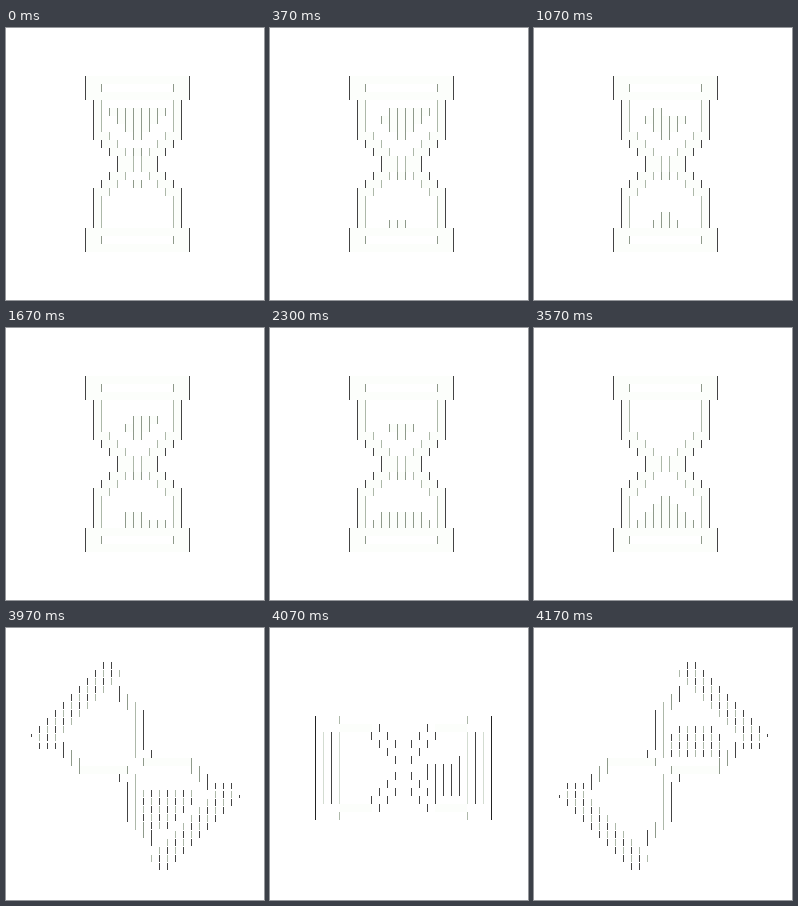
An HTML page with a canvas for the animation above (4.2 s loop, 258 by 272 pixels).

```html
<!DOCTYPE html>
<html lang="en">
<head>
<meta charset="utf-8">
<title>Hourglass</title>
<style>
  html, body { margin: 0; width: 100%; height: 100%; overflow: hidden; background: #fff; }
  canvas { display: block; }
</style>
</head>
<body>
<canvas id="stage" width="258" height="272"></canvas>
<script>
const ctx = document.getElementById('stage').getContext('2d');
const LOOP = 4200, CELL = 8;
const DARK = '#444', MID = '#8f9a8b', LIGHT = '#adb8a9', SOFT = '#d3dcd1', PALE = '#fcfefb';

// time, sand leaving above, sand landing below; sand as triples: row, first column, last column
const STEPS = [
  [370, [0, 3, 4], [0, 5, 6]],
  [700, [0, 6, 7], [0, 7, 7]],
  [1070, [0, 8, 9], [1, 6, 6]],
  [1370, [0, 5, 5], [0, 8, 9]],
  [1670, [1, 4, 5], [1, 5, 5]],
  [1970, [1, 6, 6], [0, 3, 4, 1, 4, 4]],
  [2300, [1, 7, 8], [1, 7, 8]],
  [2600, [2, 6, 7], [2, 6, 7]],
  [2900, [2, 5, 5], [2, 5, 5]],
  [3270, [3, 6, 6], [3, 6, 6]],
  [3570, [], []]
];

function fill(x, y, w, h, color) {
  ctx.fillStyle = color;
  ctx.fillRect(x, y, w, h);
}

function line(x, y0, y1, color = DARK) {
  fill(x, y0, 1, y1 - y0, color);
}

// one line and its three mirror images; sx and sy are the mirror sums
function quad(sx, sy, x, y0, y1, color) {
  for (const mx of [x, sx - x]) {
    line(mx, y0, y1, color);
    line(mx, sy - y1, sy - y0, color);
  }
}

function eachCell(triples, visit) {
  for (let i = 0; i < triples.length; i += 3)
    for (let c = triples[i + 1]; c <= triples[i + 2]; c++) visit(triples[i], c);
}

function drawCell(c, y) {
  const x = 79 + c * CELL;
  fill(x + 1, y, CELL - 1, CELL, PALE);
  line(x, y, y + CELL, MID);
  line(x + CELL, y, y + CELL, MID);
}

function upright(step) {
  const edge = (x, y0, y1, color) => quad(262, 272, x, y0, y1, color);
  // glass wall: pale body, dark outside, light inside
  const wall = (x0, x1, y0, y1) => {
    for (let x = x0 + 1; x < x1; x++) edge(x, y0, y1, PALE);
    edge(x0, y0, y1);
    edge(x1, y0, y1, LIGHT);
  };
  for (const y of [48, 200]) {
    fill(80, y, 103, 24, PALE);
    fill(96, y + 8, 71, 8, '#fff');
  }
  edge(79, 48, 72);
  edge(95, 56, 64, MID);
  wall(87, 95, 72, 104);
  wall(87, 103, 104, 112);
  wall(95, 111, 112, 120);
  wall(103, 119, 120, 128);
  wall(111, 127, 128, 136);

  const top = new Set();
  for (let r = 0; r < 4; r++)
    for (let c = 3 + r; c <= 9 - r; c++) top.add(r * 16 + c);
  for (const [, out, landed] of STEPS.slice(0, step)) {
    eachCell(out, (r, c) => top.delete(r * 16 + c));
    eachCell(landed, (r, c) => drawCell(c, 192 - r * CELL));
  }
  for (const id of top) drawCell(id % 16, 80 + (id >> 4) * CELL);

  // falling grains in the neck
  if (step < 7 && step % 2 === 0) {
    drawCell(6, 120);
    drawCell(6, 152);
  } else if (step < STEPS.length) {
    drawCell(6, 144);
  }
}

// a row of short lines, alternately dark and light
function dashes(x0, x1, y) {
  for (let x = x0; x <= x1; x += CELL)
    line(x, y, y + CELL - 1, (x + y - 131) / CELL % 2 ? LIGHT : DARK);
}

function tilted(flip) {
  ctx.save();
  if (flip) {
    ctx.translate(0, 276);
    ctx.scale(1, -1);
  }
  const pair = (x, y0, y1, color) => {
    line(x, y0, y1, color);
    line(258 - x, 276 - y1, 276 - y0, color);
  };
  fill(74, 138, 47, 8, PALE);
  fill(138, 130, 47, 8, PALE);

  // end caps
  pair(97, 34, 41);
  pair(105, 34, 41);
  for (let y = 42; y <= 106; y += CELL)
    for (let i = 0; i < 4; i++)
      pair(131 - y + i * CELL, y, y + (y === 106 && !i ? 3 : CELL - 1), i % 2 ? LIGHT : DARK);
  for (let x = 33; x <= 49; x += CELL) pair(x, 115, 121);

  // glass
  pair(113, 58, 74);
  pair(121, 66, 82, MID);
  pair(129, 74, 130, LIGHT);
  pair(137, 82, 122);
  pair(145, 122, 130);
  pair(137, 130, 138, MID);
  pair(57, 114, 130);
  pair(65, 122, 138, MID);
  pair(73, 130, 146, MID);
  ctx.restore();

  if (flip) {
    dashes(145, 177, 98);
    for (let y = 106; y <= 122; y += CELL) dashes(137, 185, y);
  } else {
    for (let y = 162; y <= 186; y += CELL) dashes(137, Math.min(185, 355 - y), y);
    dashes(145, 161, 194);
  }
}

function sideways() {
  const edge = (x, y0, y1, color) => quad(266, 280, x, y0, y1, color);
  for (const x of [70, 165])
    for (const y of [96, 176]) fill(x, y, 32, 8, PALE);
  edge(45, 88, 140, '#222');
  edge(53, 104, 140, SOFT);
  edge(61, 104, 140);
  edge(69, 104, 140, SOFT);
  edge(69, 88, 96, LIGHT);
  for (let i = 0; i < 3; i++) {
    edge(101 + i * CELL, 104 + i * CELL, 112 + i * CELL);
    edge(109 + i * CELL, 96 + i * CELL, 104 + i * CELL);
  }
  edge(125, 128, 136);

  line(157, 136, 152);
  for (let x = 165; x <= 181; x += CELL) line(x, 136, 168);
  line(189, 128, 168);
}

function draw(t) {
  fill(0, 0, 258, 272, '#fff');
  if (t >= 4170) tilted(true);
  else if (t >= 4070) sideways();
  else if (t >= 3970) tilted(false);
  else upright(STEPS.filter(s => t >= s[0]).length);
}

const start = performance.now();
function tick() {
  draw((performance.now() - start) % LOOP);
  requestAnimationFrame(tick);
}
tick();
</script>
</body>
</html>
```
